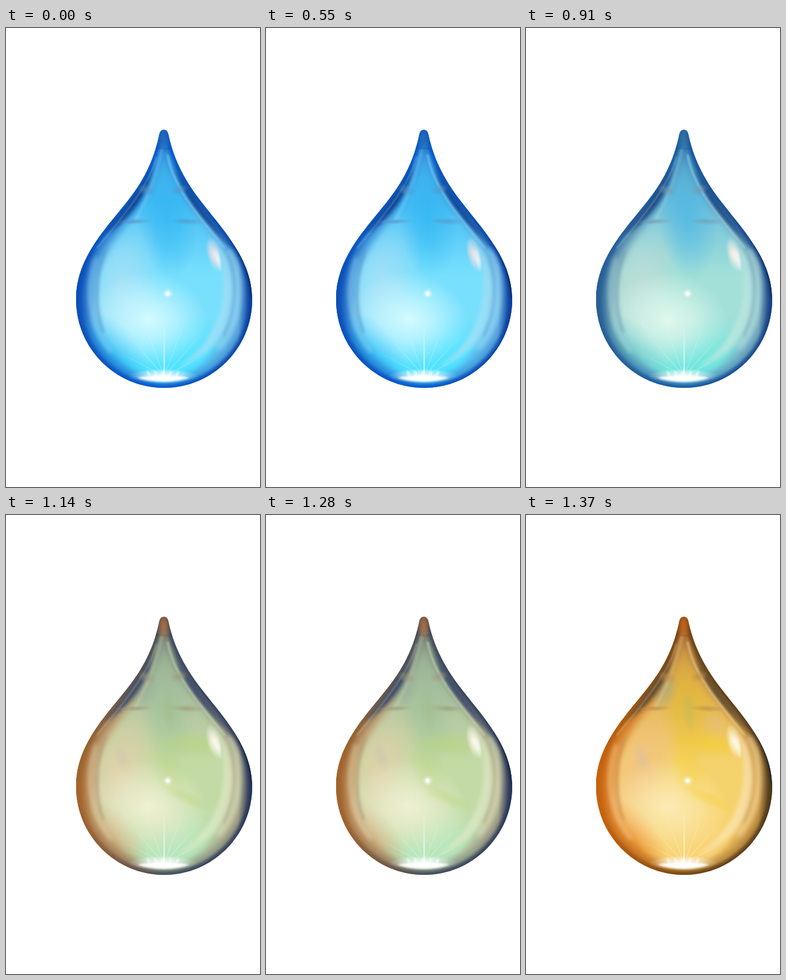
An HTML page with a canvas for the animation above (1.6 s loop, 424 by 764 pixels).

```html
<!DOCTYPE html>
<html lang="en">
<head>
<meta charset="utf-8">
<title>Drop</title>
<style>
html, body { margin: 0; width: 100%; height: 100%; overflow: hidden; background: #fff; }
canvas { display: block; width: 424px; height: 764px; }
</style>
</head>
<body>
<canvas id="stage" width="424" height="764"></canvas>
<script>
const ctx = document.getElementById('stage').getContext('2d');
const LOOP = 1600;
const CUTS = [0, 910, 1140, 1370];

// From water to oil
const PALETTES = [
  { tip: '#2567b4', rimL: '#0c50b8', rimR: '#0a3f9e', rimB: '#0658cc', sideL: '#3c94dc', sideR: '#6cbbea',
    top: '#3fa6e4', upper: '#46bcf3', mid: '#78e0fd', left: '#a9e0f5', glow: '#d8fcff', low: '#48e4ff',
    lowL: '#35bef5', dark: '#0b3482', band: '#a5e0f5', tint: '#23b1f2', smudge: '#5795c8', flare: '#f5e1e6' },
  { tip: '#366f9f', rimL: '#285f96', rimR: '#174285', rimB: '#1658a4', sideL: '#6da2b8', sideR: '#8bbfca',
    top: '#4f9fc9', upper: '#6cbfdc', mid: '#a2e0d8', left: '#bfdcd5', glow: '#e2f9ee', low: '#69e9df',
    lowL: '#6fc6cc', dark: '#173e7b', band: '#bfe7e0', tint: '#3cb0e8', smudge: '#7499b0', flare: '#fff0e8' },
  { tip: '#b06e3b', rimL: '#a5652b', rimR: '#28375a', rimB: '#414a5c', sideL: '#c49461', sideR: '#bdb792',
    top: '#91a38c', upper: '#a8bf9c', mid: '#c3daa4', left: '#e3cfa8', glow: '#f1f2d6', low: '#b6e9c2',
    lowL: '#cfaa7a', dark: '#303e64', band: '#dce8c4', tint: '#9abf9b', smudge: '#9c987c', flare: '#fff8ed' },
  { tip: '#c9661d', rimL: '#c8640e', rimR: '#4b381e', rimB: '#6e4014', sideL: '#e4862a', sideR: '#dda54e',
    top: '#c88e48', upper: '#deb050', mid: '#f5d36c', left: '#f1c084', glow: '#fcecb8', low: '#fad579',
    lowL: '#ec9233', dark: '#51412f', band: '#fae5b1', tint: '#e8c022', smudge: '#bd8c4b', flare: '#fff8e6' }
];

const OUTLINE = new Path2D('M263.5 169.5C258 169.5 256.5 174 255.5 179C248 213 235 248 203 288' +
  'C166 335 117 383 117 452C117 533 183 599 264 599C345 599 411 533 411 452' +
  'C411 385 362 336 325 288C294 248 279 213 271.5 179C270.5 174 269 169.5 263.5 169.5Z');
const BODY = new Path2D('M263 194C256 235 241 277 215 313C184 352 153 385 153 445' +
  'C153 530 205 586 263 586C325 586 371 520 371 435C371 385 345 345 315 308C285 272 270 235 263 194Z');

function gradient(x0, y0, x1, y1, stops) {
  const g = ctx.createLinearGradient(x0, y0, x1, y1);
  stops.forEach(([at, color]) => g.addColorStop(at, color));
  return g;
}

function soft(blur, alpha, paint) {
  ctx.save();
  ctx.filter = blur ? `blur(${blur}px)` : 'none';
  ctx.globalAlpha = alpha;
  paint();
  ctx.restore();
}

function blob(x, y, rx, ry, angle, color, alpha) {
  ctx.save();
  ctx.translate(x, y);
  ctx.rotate(angle);
  ctx.scale(rx, ry);
  ctx.globalAlpha = alpha;
  const g = ctx.createRadialGradient(0, 0, 0, 0, 0, 1);
  g.addColorStop(0, color);
  g.addColorStop(0.45, color + 'a0');
  g.addColorStop(1, color + '00');
  ctx.fillStyle = g;
  ctx.fillRect(-1, -1, 2, 2);
  ctx.restore();
}

function streak(d, color, width, blur, alpha) {
  soft(blur, alpha, () => {
    ctx.strokeStyle = color;
    ctx.lineWidth = width;
    ctx.lineCap = 'round';
    ctx.stroke(new Path2D(d));
  });
}

function shape(d, color, blur, alpha) {
  soft(blur, alpha, () => {
    ctx.fillStyle = color;
    ctx.fill(new Path2D(d));
  });
}

function drawShell(p) {
  ctx.fillStyle = gradient(117, 0, 411, 0,
    [[0, p.rimL], [0.1, p.sideL], [0.5, p.upper], [0.92, p.sideR], [1, p.rimR]]);
  ctx.fill(OUTLINE);
  ctx.fillStyle = gradient(0, 170, 0, 340, [[0, p.tip], [0.25, p.top], [1, p.top + '00']]);
  ctx.fill(OUTLINE);
}

function drawBody(p) {
  soft(5, 1, () => {
    ctx.fillStyle = gradient(0, 195, 0, 586,
      [[0, p.top], [0.25, p.upper], [0.55, p.mid], [0.8, p.mid], [1, p.low]]);
    ctx.fill(BODY);
  });
  blob(190, 425, 65, 125, 0.25, p.left, 0.85);
  blob(270, 320, 48, 100, -0.1, p.tint, 0.5);
  blob(300, 535, 75, 55, -0.5, p.low, 0.6);
  blob(178, 535, 75, 42, 0.85, p.lowL, 0.85);
  blob(238, 485, 100, 78, 0.15, p.glow, 0.95);
}

function drawRim(p) {
  const sides = (left, bottom, right) =>
    gradient(117, 0, 411, 0, [[0, left], [0.5, bottom], [1, right]]);
  const layers = [
    [30, 7, 0.7, sides(p.rimL, p.rimB + '70', p.rimR + '80')],
    [13, 2, 0.8, sides(p.rimL, p.rimB, p.rimR)],
    [5, 0.8, 0.6, sides(p.rimL, p.rimB, p.rimR)]
  ];
  layers.forEach(([width, blur, alpha, paint]) => soft(blur, alpha, () => {
    ctx.strokeStyle = paint;
    ctx.lineWidth = width;
    ctx.stroke(OUTLINE);
  }));
  blob(263, 181, 13, 30, 0, p.tip, 0.8);
}

function drawFolds(p) {
  shape('M246 222C238 250 214 282 165 345C205 318 240 280 246 222Z', p.dark, 3, 0.85);
  shape('M281 222C289 250 315 285 385 375C340 330 290 285 281 222Z', p.dark, 3, 0.85);
  streak('M251 215C238 266 188 322 152 366', p.band, 2, 1.2, 0.35);
  streak('M270 212C280 268 324 316 365 366', p.band, 3, 1.5, 0.55);
  streak('M260 202C250 250 233 290 215 321', p.band, 4, 2, 0.35);
  streak('M150 385C130 435 141 498 174 538', p.band, 7, 3, 0.35);
  streak('M165 372C145 425 151 475 162 505', p.smudge, 5, 2, 0.45);
  streak('M373 374C397 420 393 485 356 530', p.band, 11, 4, 0.55);
  streak('M372 378C386 423 381 470 364 510', p.smudge, 5, 2, 0.35);
  shape('M337 340C369 378 371 455 347 498C331 530 307 551 286 565C351 543 379 496 379 438C379 399 363 365 337 340Z',
    p.band, 3, 0.75);
  blob(214, 322, 30, 5, -0.04, p.smudge, 0.75);
  blob(303, 322, 30, 6, 0.04, p.smudge, 0.65);
  blob(235, 270, 16, 10, 0.3, p.smudge, 0.65);
  blob(289, 269, 16, 9, -0.3, p.smudge, 0.65);
  streak('M251 199Q263 202 274 200', p.dark, 1.5, 0.8, 0.4);
  streak('M382 362Q407 400 410 447', '#101c38', 2.5, 0.8, 0.75);
}

function drawLight(p) {
  blob(347, 377, 12, 30, -0.25, p.flare, 1);
  blob(354, 386, 6, 22, -0.2, '#ffffff', 0.65);
  blob(262, 579, 58, 12, 0, '#ffffff', 0.85);
  shape('M219 582Q264 574 306 582Q286 589 264 589Q239 589 219 582Z', '#ffffff', 1.5, 0.95);
  for (let i = -3; i <= 3; i++) {
    const a = i * 0.36;
    const length = i ? 108 - 6 * Math.abs(i) : 92;
    const x = 264 + Math.sin(a) * length;
    const y = 580 - Math.cos(a) * length;
    streak(`M264 580L${x} ${y}`, gradient(264, 580, x, y,
      [[0, '#ffffff'], [0.4, '#ffffffb0'], [1, '#ffffff00']]), i ? 1.2 : 2.4, 0.7, i ? 0.35 : 0.7);
  }
  for (let i = -2; i <= 2; i++) blob(262 + i * 12, 576, 4, 8, i * 0.2, '#ffffff', 0.6);
  blob(270, 442, 9, 9, 0, '#ffffff', 0.6);
  ctx.fillStyle = '#fff';
  ctx.beginPath();
  ctx.arc(270, 442, 3.5, 0, Math.PI * 2);
  ctx.fill();
}

function drawOil(step) {
  if (step < 2) return;
  const yellow = step === 3 ? '#f6cf28' : '#b9d477';
  blob(310, 382, 58, 22, 0.1, yellow, 0.55);
  blob(270, 420, 28, 65, -0.3, yellow, 0.35);
  blob(305, 472, 45, 12, 0.45, yellow, 0.4);
  blob(232, 292, 22, 38, 0.35, '#91a69c', 0.5);
  blob(272, 326, 14, 38, -0.1, '#a4b77a', 0.35);
  blob(193, 404, 13, 28, -0.4, '#c7c2b9', 0.4);
  blob(313, 345, 25, 18, 0.3, step === 3 ? '#e7bd77' : '#bdc9a6', 0.65);
}

function draw(step) {
  const p = PALETTES[step];
  ctx.fillStyle = '#fff';
  ctx.fillRect(0, 0, 424, 764);
  ctx.save();
  ctx.clip(OUTLINE);
  drawShell(p);
  drawBody(p);
  drawOil(step);
  drawRim(p);
  drawFolds(p);
  drawLight(p);
  ctx.restore();
}

let shown = -1;
function tick() {
  const time = performance.now() % LOOP;
  const step = CUTS.filter(cut => cut <= time).length - 1;
  if (step !== shown) draw(shown = step);
  requestAnimationFrame(tick);
}
tick();
</script>
</body>
</html>
```
